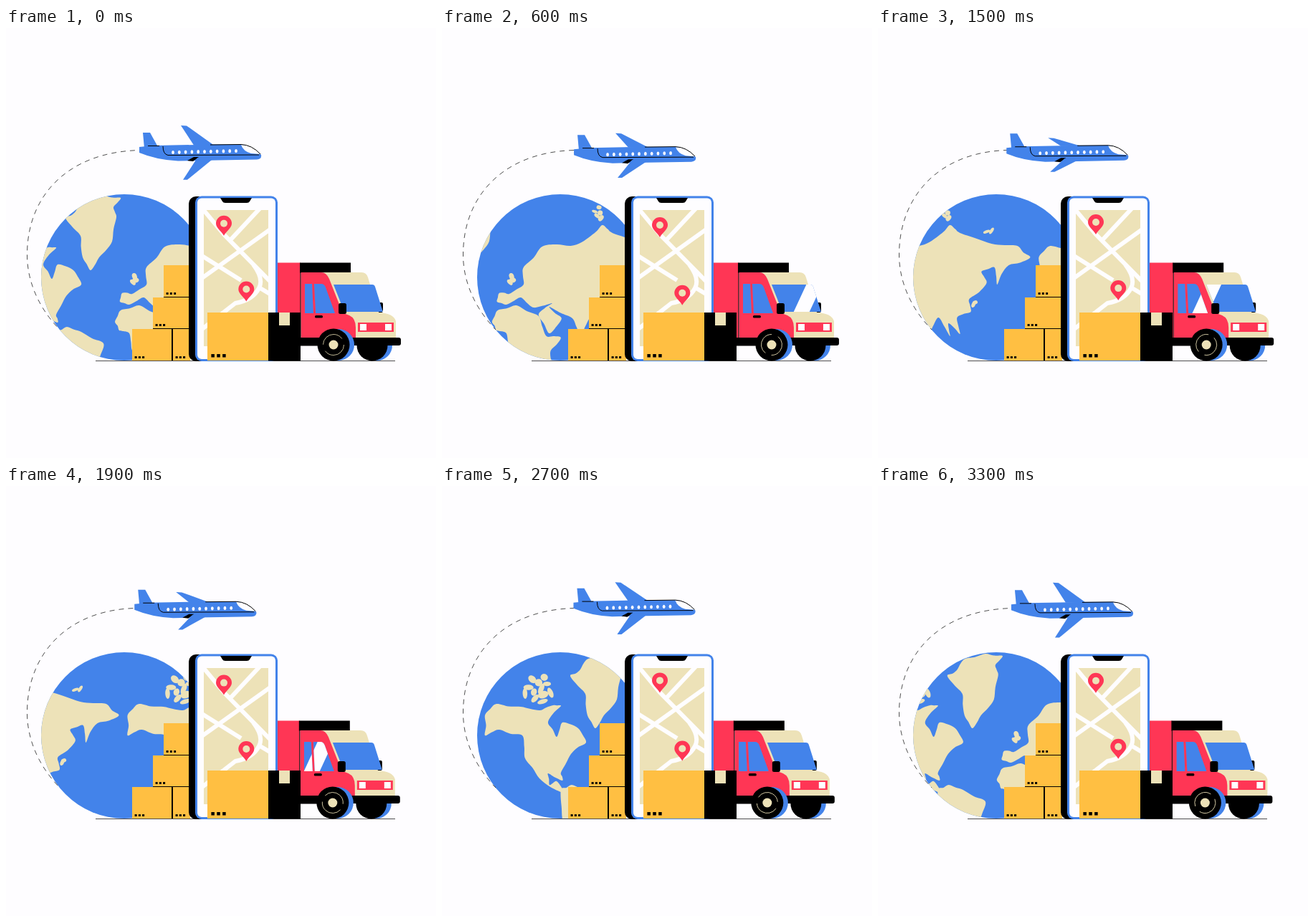
Recreate the animation shown at these times as an HTML page. Size 600 px wide and 600 px high, loop 3.4 s.

```html
<!DOCTYPE html>
<html lang="en">
<head>
<meta charset="utf-8">
<title>Worldwide delivery</title>
<style>
  html, body { margin: 0; width: 100%; height: 100%; overflow: hidden; background: #fefdff; }
  svg { display: block; width: 100vw; height: 100vh; }
  .blue { fill: #4383ea; }
  .cream { fill: #ede2b8; }
  .red { fill: #ff3655; }
  .yellow { fill: #ffbf42; }
  .white { fill: #fefdff; }
  .line { fill: none; stroke: #000; stroke-width: 1; }
  .thin { stroke: #222; stroke-width: .8; }
  .road { fill: none; stroke: #fefdff; stroke-width: 6; }
</style>
</head>
<body>
<svg viewBox="0 0 600 600">
  <defs>
    <clipPath id="globeClip"><circle cx="165" cy="348" r="116"/></clipPath>
    <clipPath id="mapClip"><rect x="276" y="254" width="90" height="190"/></clipPath>
    <clipPath id="glassClip">
      <path d="M417 357H427L429 398H417ZM430 357H440Q444 357 446 362L459 398H432Z"/>
      <path d="M457 358H511Q514 358 515 361L526 396H472Z"/>
    </clipPath>
    <g id="pin">
      <path class="red" d="M0 0C-4 -7 -11 -11 -11 -17A11 11 0 0 1 11 -17C11 -11 4 -7 0 0Z"/>
      <circle class="cream" cy="-17" r="5"/>
    </g>
  </defs>

  <g clip-path="url(#globeClip)">
    <rect class="blue" x="49" y="232" width="232" height="232"/>
    <g id="world" class="cream"></g>
  </g>
  <path id="trail" class="line thin" stroke-dasharray="7 6"/>

  <g id="plane">
    <path id="upperWing" class="blue"/>
    <path class="blue" d="M191 146H201L211 164L193 168Z"/>
    <path class="blue" d="M186 166L207 164L290 162.5H328Q341 163 356 177Q357 183 350 183.5L240 185.5Q210 184 186 174Z"/>
    <path d="M253 185L262 180H269L261 186Z"/>
    <path id="lowerWing" class="blue"/>
    <path class="white" d="M328 163Q344 163 355 176L342 175Q331 172 328 163Z"/>
    <path class="line" d="M198 164.5H214M219 165Q219 176 226 177.5L353 177M285 163L328 162.5Q343 163 355 176"/>
    <g id="portholes" class="white"></g>
  </g>

  <path class="line thin" d="M125 464.5H543"/>
  <g id="parcels"></g>

  <g id="truck">
    <rect class="red" x="370" y="327.5" width="41" height="106"/>
    <rect x="410" y="327.5" width="71" height="14"/>
    <circle class="blue" cx="518" cy="443" r="21"/>
    <circle cx="511" cy="443" r="21.5"/>
    <rect x="519" y="383" width="7" height="14" rx="2"/>
    <path class="cream" d="M440 341H496Q503 341 505 348L520 397Q541 398 544 409V433H440Z"/>
    <path class="red" d="M411.5 341H440Q447 341 451 350L466 388Q469 399 479 401Q488 405 488 418V433H411.5Z"/>
    <g clip-path="url(#glassClip)">
      <rect class="blue" x="410" y="350" width="120" height="55"/>
      <path id="glint" class="white" d="M-1 357H21L2 398H-20Z"/>
    </g>
    <path class="line" d="M411 341V433"/>
    <rect x="431" y="401" width="11" height="3.5" rx="1.5"/>
    <rect x="464" y="384" width="11" height="15" rx="2.5"/>
    <rect class="red" x="491" y="411" width="50" height="13"/>
    <path class="white" d="M494 413H503V422H494ZM529 413H538V422H529Z"/>
    <rect x="400" y="432" width="60" height="11.5"/>
    <rect x="480" y="432" width="71" height="11" rx="3"/>
    <circle class="blue" cx="464" cy="442" r="22"/>
    <circle cx="457" cy="442" r="22.5"/>
    <circle id="rim" cx="457" cy="442" r="14.5" fill="none" stroke="#ede2b8" stroke-width=".8" stroke-dasharray="36 9.55"/>
    <circle class="cream" cx="457" cy="442" r="6.5"/>
  </g>

  <g>
    <rect x="255" y="235" width="40" height="230" rx="10"/>
    <rect class="blue" x="264" y="234.5" width="115" height="230.5" rx="9"/>
    <rect class="white" x="267" y="237.5" width="109" height="224.5" rx="6"/>
    <path d="M299 237H343L340 242Q339 244 336 244H306Q303 244 302 242Z"/>
    <g clip-path="url(#mapClip)">
      <rect class="cream" x="276" y="254" width="90" height="190"/>
      <path class="road" d="M274 252L304 288L370 355M354 252L312 297M370 280L272 350M272 317L328 352M345 330Q360 350 353 363Q344 380 320 384L270 423M353 362L370 372"/>
    </g>
    <use id="pinA" href="#pin"/>
    <use id="pinB" href="#pin"/>
  </g>

  <g id="bigParcel"></g>
  <rect x="366" y="397" width="45" height="67.5"/>
  <rect class="cream" x="381" y="397" width="15" height="18"/>
</svg>

<script>
const LOOP = 3400, STEP = 100, MAP_WIDTH = 466;
const $ = id => document.getElementById(id);
const move = (id, x, y) => $(id).setAttribute('transform', `translate(${x.toFixed(2)} ${y.toFixed(2)})`);
const repeat = (count, make) => Array.from({ length: count }, (_, i) => make(i)).join('');

let seed = 7;
const random = () => (seed = seed * 16807 % 2147483647) / 2147483647;

// Each side of the rough outline gets a small random bay or cape, then the coast is smoothed.
function land(text) {
  const keys = text.split(' ').map(p => p.split(',').map(Number));
  const coast = keys.flatMap(([x, y], i) => {
    const [nx, ny] = keys[(i + 1) % keys.length];
    const bend = (random() - 0.5) * 0.16;
    return [[x, y], [(x + nx) / 2 + (ny - y) * bend, (y + ny) / 2 - (nx - x) * bend]];
  });
  const at = i => coast[(i + coast.length) % coast.length];
  const handle = (i, sign) => at(i).map((v, k) => v + sign * (at(i + 1)[k] - at(i - 1)[k]) / 6);
  const curves = coast.map((_, i) => `C${handle(i, 1)} ${handle(i + 1, -1)} ${at(i + 1)}`);
  return `<path d="M${at(0)}${curves.join('')}Z"/>`;
}

// Islands spread on a sunflower spiral.
const islands = (x, y, width, height, count, size) => repeat(count, i => {
  const turn = i * 2.4, reach = Math.sqrt((i + 0.5) / count);
  const cx = x + width * reach * Math.cos(turn), cy = y + height * reach * Math.sin(turn);
  return `<ellipse rx="${size * (0.8 + random() * 0.5)}" ry="${size * (0.5 + random() * 0.4)}"
    transform="translate(${cx} ${cy}) rotate(${random() * 180})"/>`;
});

const greenland = '83,265 97,256 108,241 136,234 160,237 150,250 154,264 148,298 130,320 118,338 107,320 104,290';
const northAmerica = '-36,320 -20,304 14,308 41,313 59,306 70,307 52,330 64,350 72,330 94,338 105,358 ' +
  '84,374 70,400 72,411 52,401 54,417 64,412 74,428 40,408 20,380 16,348 -16,340 -36,348';
const southAmerica = '70,424 85,417 105,424 136,440 124,470 75,470';
const eurasia = '222,305 262,304 290,290 306,275 320,286 364,301 400,304 418,320 388,331 372,358 368,334 ' +
  '350,340 357,356 333,378 335,396 316,404 320,427 304,412 306,430 290,404 276,429 264,405 232,389 ' +
  '249,405 232,426 217,400 236,384 210,390 192,376 172,386 159,382 162,370 176,371 196,358 196,334';
const africa = '152,410 160,394 186,387 217,402 228,430 248,432 234,450 236,470 190,475 176,450 172,426 158,422';

const continents = [greenland, northAmerica, southAmerica, eurasia, africa].map(land).join('') +
  islands(38, 283, 22, 19, 12, 6) +     // Arctic Canada
  islands(301, 258, 6, 11, 5, 4) +      // Barents Sea
  islands(361, 283, 6, 2, 2, 4) +       // East Siberian Sea
  islands(179, 352, 4, 6, 3, 4) +       // Britain
  islands(340, 383, 2, 5, 2, 4);        // Japan
$('world').innerHTML = continents + `<g transform="translate(${MAP_WIDTH})">${continents}</g>`;

$('portholes').innerHTML = repeat(11, i =>
  `<ellipse cx="${233 + 8.8 * i}" cy="${173.5 - 0.2 * i}" rx="1.9" ry="2.6"/>`);

const parcel = (x, y, width, height, dot = 3) =>
  `<rect class="yellow" x="${x}" y="${y}" width="${width}" height="${height}"/>` +
  repeat(3, i => `<rect x="${x + dot * (1.2 + 1.75 * i)}" y="${y + height - dot * 2}" width="${dot}" height="${dot}"/>`);

$('parcels').innerHTML = parcel(220, 331, 37, 44) + parcel(205, 376, 52, 43) +
  parcel(176, 420, 55, 44) + parcel(233, 420, 24, 44) +
  '<path class="line" d="M220 375.5H257M205 419.5H257"/><rect x="231" y="420" width="2" height="44"/>';
$('bigParcel').innerHTML = parcel(281, 397, 85, 67, 4.5);

function draw(ms) {
  const p = ms / LOOP, angle = 2 * Math.PI * p;

  move('world', -MAP_WIDTH * p, 0);

  const planeX = 3.5 * (Math.cos(angle) - 1), planeY = 3.5 * Math.sin(angle);
  const roll = Math.cos(angle + 0.47);
  const top = 143.5 - 8.5 * roll, bottom = 206 + 6.5 * roll;
  move('plane', planeX, planeY);
  $('upperWing').setAttribute('d', `M244 ${top}L252 ${top + 0.5}L290 163.5H262Z`);
  $('lowerWing').setAttribute('d', `M267 181L292 180L253 ${bottom}H247Z`);

  $('trail').setAttribute('d', `M${187 + planeX} 170.5C85 173 30 235 29.5 315C29 345 40 385 75 421`);
  $('trail').setAttribute('stroke-dashoffset', 6 - 39 * p);

  const truckX = 3.3 * Math.sin(angle);
  move('truck', truckX, 0);
  move('glint', 544 - 0.057 * ms - truckX, 0);
  $('rim').setAttribute('transform', `rotate(${720 * p} 457 442)`);

  move('pinA', 304, 289.8 + 2.7 * Math.sin(2 * angle));
  move('pinB', 335.3, 383.4 + 3.4 * Math.sin(2 * angle - 0.565));
}

const start = performance.now();
function tick() {
  const ms = (performance.now() - start) % LOOP;
  draw(Math.floor(ms / STEP) * STEP);
  requestAnimationFrame(tick);
}
tick();
</script>
</body>
</html>
```
